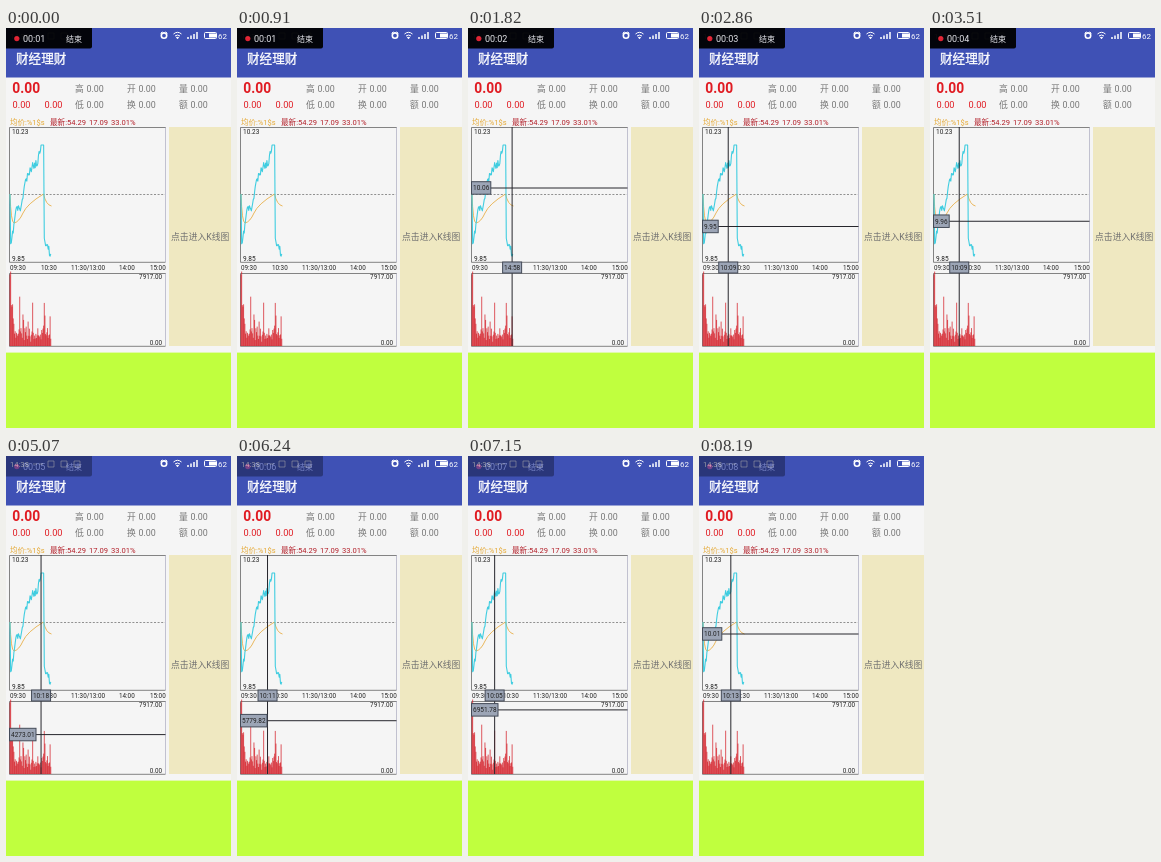
Recreate the animation shown at these times as an HTML page. Size 225x400 px, loop 8320 ms.

```html
<!DOCTYPE html>
<html lang="zh">
<head>
<meta charset="utf-8">
<style>
html, body { margin: 0; height: 100%; overflow: hidden; background: #f5f5f5; }
svg { display: block; width: 100vw; height: 100vh; }
text { font-family: Roboto, "Noto Sans CJK SC", "Noto Sans CJK", sans-serif; white-space: pre; }
</style>
</head>
<body>
<svg viewBox="0 0 225 400">
  <rect width="225" height="400" fill="#f5f5f5"/>
  <rect width="225" height="49.5" fill="#3f51b5"/>
  <rect x="163" y="99" width="62" height="219" fill="#efe8c1"/>
  <rect y="324.6" width="225" height="76" fill="#c0ff3e"/>

  <g id="status" fill="none" stroke="#fff">
    <path d="M27 8h4M33 8h4M42 5h6v6h-6zM55 5h6v6h-6zM68 5h6v6h-6z" opacity=".5"/>
    <circle cx="158" cy="7.6" r="2.7" stroke-width="1.6"/>
    <path d="M154.6 5.4l1.8-1.6M161.4 5.4l-1.8-1.6M167.5 6q4-3.4 8 0M169 8q2.5-2 5 0"/>
    <path d="M170.5 9.4h2l-1 1.4z" fill="#fff"/>
    <path d="M182 11v-2M185 11v-3.5M188 11v-5M191 11v-7" stroke-width="1.5"/>
    <rect x="198.5" y="4.5" width="12" height="6" rx="1"/>
    <path d="M203 7.5h7" stroke-width="4"/>
  </g>
  <g id="pill">
    <path d="M0 0H86V18.5Q86 20.5 84 20.5H0Z"/>
    <circle cx="10.8" cy="10.6" r="2.6" fill="#e8202c"/>
  </g>

  <g fill="none" stroke-width=".8">
    <path d="M159.5 99V234M159.5 245V318" stroke="#b4b4c6"/>
    <path d="M159.5 99.5H3.5V234.3H159.5M159.5 245.5H3.5V318.3H159.5" stroke="#666"/>
    <path d="M4 166.5H159" stroke="#777" stroke-dasharray="2 1.6"/>
  </g>
  <path id="bars" stroke="#d3141e" stroke-width=".7"/>
  <g fill="none" stroke-linejoin="round">
    <path d="M4 166Q5 195 8 195Q13 194 17 185T37.5 166Q40 177 45.5 178" stroke="#e8b04c" stroke-width=".9"/>
    <path id="price" stroke="#3fcde0" stroke-width="1.1"/>
  </g>
  <g id="labels"></g>
  <g id="cross" stroke="#26262c">
    <path id="lines"/>
    <g fill="#9ca5b6" stroke="#444b58">
      <rect id="valBox" x="3.5" height="12.5"/>
      <rect id="timeBox" y="234" width="19" height="11"/>
    </g>
  </g>
</svg>
<script>
const $ = id => document.getElementById(id);
const set = (el, attrs) => { for (const k in attrs) el.setAttribute(k, attrs[k]); };
const text = (parent, str, x, y, size, fill, more) => {
  const el = document.createElementNS('http://www.w3.org/2000/svg', 'text');
  set(el, { x, y, 'font-size': size, fill, stroke: 'none', ...more });
  el.textContent = str;
  return parent.appendChild(el);
};
const L = $('labels'), red = '#e01b22', maroon = '#b3202a', dark = '#222', grey = '#777';
const end = { 'text-anchor': 'end' }, mid = { 'text-anchor': 'middle' };

// Status bar and header
text($('status'), '14:38', 4, 11, 7.6, '#dde1f4');
text($('status'), '62', 212, 10.6, 8, '#fff');
text(L, '财经理财', 10, 35.3, 12.6, '#fff', { stroke: '#fff', 'stroke-width': 0.3 });
text(L, '0.00', 6.3, 65, 13.8, red, { 'font-weight': 700 });
text(L, '0.00', 6.6, 79.6, 9.2, red);
text(L, '0.00', 38.6, 79.6, 9.2, red);
['高开量', '低换额'].forEach((row, r) => [...row].forEach((c, i) => {
  text(L, c, 69 + 52 * i, 63.5 + 16 * r, 8.8, grey);
  text(L, '0.00', 80.5 + 52 * i, 63.5 + 16 * r, 8.9, grey);
}));
text(L, '均价:%1$s', 4, 97, 7.5, '#e5a936');
text(L, '最新:54.29', 44, 97, 7.6, maroon);
text(L, '17.09', 83, 97, 7.6, maroon);
text(L, '33.01%', 105, 97, 7.6, maroon);

// Chart labels
text(L, '10.23', 6, 105.8, 6.5, dark);
text(L, '9.85', 6, 233, 6.5, dark);
[['09:30', 4], ['10:30', 35], ['11:30/13:00', 65], ['14:00', 113], ['15:00', 144]]
  .forEach(([s, x]) => text(L, s, x, 242.4, 6.3, dark));
text(L, '7917.00', 156, 250.6, 6.3, dark, end);
text(L, '0.00', 156, 317, 6.3, dark, end);
text(L, '点击进入K线图', 194.2, 212, 8.8, '#707070', mid);

const clock = text($('pill'), '', 17, 14, 9, '#eee');
text($('pill'), '结束', 60, 13.8, 8, '#eee');
const valText = text($('cross'), '', 5, 0, 6.5, dark);
const timeText = text($('cross'), '', 0, 242, 6.5, dark, mid);

// Interpolates [key, ...values] rows linearly
const at = (rows, k) => {
  const i = Math.max(1, rows.findIndex(r => r[0] >= k));
  const a = rows[i - 1], b = rows[i], f = (k - a[0]) / (b[0] - a[0]);
  return a.slice(1).map((v, j) => v + (b[j + 1] - v) * f);
};
let seed = 11;
const rnd = () => (seed = seed * 16807 % 2147483647) / 2147483647;
const step = 0.647, minutes = 64;

// One price point and one volume bar per minute
const trend = [[4, 166], [4.6, 220], [7, 204], [10, 181], [15.5, 180], [18.5, 156], [27, 137], [31, 136],
  [35, 117], [37.8, 117], [38.2, 210], [45.5, 229]];
let price = 'M4 166', bars = '';
for (let i = 1; i < minutes; i++) {
  const x = 4 + i * step, flat = x > 34.5 && x < 38.5;
  price += `L${x} ${at(trend, x)[0] + (flat ? 0 : (rnd() - 0.5) * 8)}`;
}
for (let i = 0; i < minutes; i++) {
  const h = 4 + 13 * rnd() + 56 * Math.exp(-i / 3) + 34 * rnd() ** 9 + 36 * Math.exp(-((i - 53) ** 2));
  bars += `M${4 + i * step} 318v${-h}`;
}
$('price').setAttribute('d', price);
$('bars').setAttribute('d', bars);

// Touch path: time, x, y
const touch = [[1040, 44, 160], [1820, 44, 160], [2860, 29, 198.5], [4160, 29.8, 188],
  [5070, 35, 278.6], [7150, 26.6, 253.9], [8190, 31.8, 178]];
const two = n => String(n).padStart(2, '0');

function draw(now) {
  const t = Math.floor(now % 8320 / 130) * 130;
  clock.textContent = '00:' + two(Math.floor(1.13 + t * 0.00094));
  $('pill').setAttribute('opacity', t < 4420 ? 0.94 : 0.32);

  const shown = t >= touch[0][0];
  $('cross').setAttribute('visibility', shown ? 'visible' : 'hidden');
  if (shown) {
    const [px, py] = at(touch, t), inVolume = py > 240;
    const min = Math.round((px - 4) / step), x = 4 + min * step;
    const y = inVolume ? Math.max(py, 246) : Math.min(py, 234);
    const val = inVolume ? 7917 * (318 - y) / 73 : 10.23 - (y - 99) / 135 * 0.38;
    const clockMin = 9 * 60 + 30 + min;
    valText.textContent = val.toFixed(2);
    valText.setAttribute('y', y + 2.3);
    timeText.textContent = min > 61 ? '14:58' : two(Math.floor(clockMin / 60)) + ':' + two(clockMin % 60);
    timeText.setAttribute('x', x);
    $('lines').setAttribute('d', `M${x} 99V234M${x} 245V318M3 ${y}H159.5`);
    set($('valBox'), { y: y - 6.3, width: 3.6 * valText.textContent.length + 1.3 });
    $('timeBox').setAttribute('x', x - 9.5);
  }
  requestAnimationFrame(() => draw(performance.now() - start));
}
const start = performance.now();
draw(0);
</script>
</body>
</html>
```
